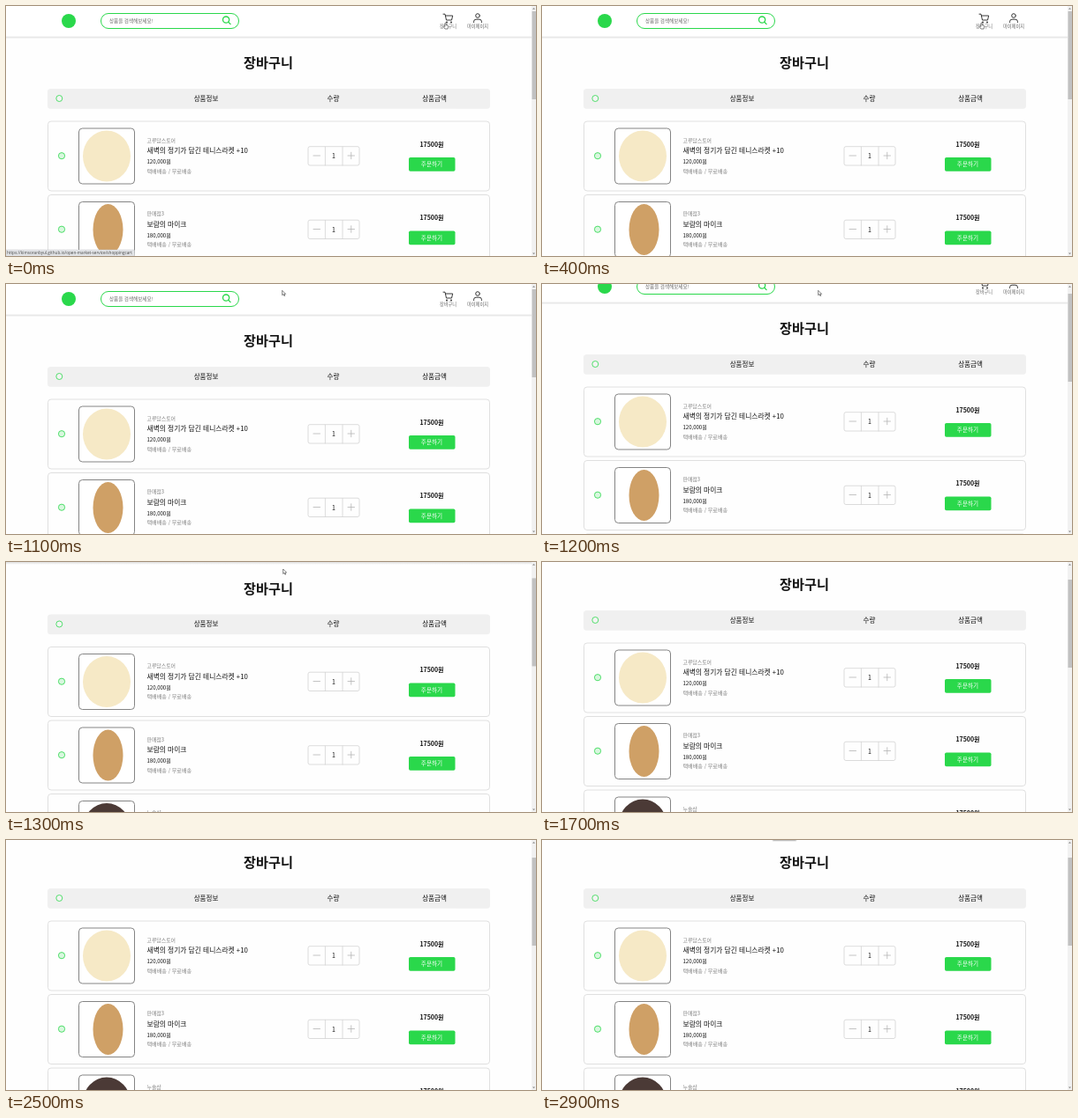
An HTML page that plays this animation: 600x284 px, repeating every 3 s.

```html
<!DOCTYPE html>
<html lang="ko">
<head>
<meta charset="utf-8">
<title>장바구니</title>
<style>
  html, body { margin: 0; width: 100%; height: 100%; overflow: hidden; background: #fefefe; }
  svg { display: block; width: 600px; height: 284px; }
  text { font-family: "Noto Sans CJK KR", "Noto Sans CJK", "Noto Sans", sans-serif; }
  .line { fill: none; stroke-linecap: round; stroke-linejoin: round; }
</style>
</head>
<body>
<svg id="stage" viewBox="0 0 600 284">
  <defs>
    <linearGradient id="shade" x1="0" y1="0" x2="0" y2="1">
      <stop offset="0" stop-color="#000" stop-opacity=".13"/>
      <stop offset="1" stop-color="#000" stop-opacity="0"/>
    </linearGradient>
  </defs>
  <rect width="600" height="284" fill="#fefefe"/>
  <g id="page"></g>
  <g id="bar">
    <rect x="595" width="5" height="284" fill="#f1f1f1"/>
    <path d="M596 3.800l1.500-1.800 1.500 1.800zM596 280.500l1.500 1.800 1.500-1.800z" fill="#888"/>
    <rect id="thumb" x="595.5" y="6" width="4.500" height="100" fill="#c1c1c1"/>
  </g>
  <g id="status">
    <path d="M0 277h144.500q1 0 1 1v6H0z" fill="#e4e6e9" stroke="#c4c6c9" stroke-width=".5"/>
    <text x="1" y="282.300" font-size="4.65" fill="#444" style="font-family:'Open Sans',sans-serif">https://kimsoranbyul.github.io/open-market-service/shoppingcart</text>
  </g>
  <g id="chip">
    <rect x="260.500" y="-4" width="28" height="5.500" rx="1.500" fill="#bbb" opacity=".5"/>
    <rect x="261.500" y="-4" width="26" height="4.800" rx="1" fill="#b4b4b4"/>
  </g>
  <g id="hand">
    <path d="M-.6 .5Q0-.4 .6 .5V2.600L2.700 3.200Q3.300 3.500 3.200 4.300L2.600 7H-.6L-2.200 4.500Q-2.200 3.600-1.300 3.900L-.6 4.500Z" fill="#fff" stroke="#333" stroke-width=".6"/>
  </g>
  <g id="arrow">
    <path d="M0 0V5.400L1.300 4.300 2.200 6.300 3.100 5.900 2.200 4H3.900Z" fill="#fff" stroke="#333" stroke-width=".6"/>
  </g>
</svg>
<script>
const GREEN = '#2ad84b', GREY = '#808080';
const $ = id => document.getElementById(id);

// Text placed by the vertical middle of its glyphs.
const text = (s, x, mid, size, { fill = '#111', weight = 400, anchor = 'start' } = {}) =>
  `<text x="${x}" y="${mid + size * 0.375}" font-size="${size}" fill="${fill}" font-weight="${weight}" text-anchor="${anchor}">${s}</text>`;
const centred = (s, x, mid, size, opts) => text(s, x, mid, size, { anchor: 'middle', ...opts });
const box = (x, y, w, h, r, fill, stroke = 'none', sw = 0.8) =>
  `<rect x="${x}" y="${y}" width="${w}" height="${h}" rx="${r}" fill="${fill}" stroke="${stroke}" stroke-width="${sw}"/>`;
const line = (d, stroke, sw) => `<path class="line" d="${d}" stroke="${stroke}" stroke-width="${sw}"/>`;
const ring = (x, y, r, fill) =>
  `<circle cx="${x}" cy="${y}" r="${r}" fill="${fill}" stroke="${GREEN}" stroke-width=".8"/>`;

const topBar = () => `
  <rect y="34.5" width="595" height="3" fill="url(#shade)"/>
  <rect width="595" height="34.5" fill="#fff"/>
  <circle cx="71" cy="17" r="8" fill="${GREEN}"/>
  ${box(107.5, 8.5, 156, 17, 8.5, '#fff', GREEN, 1)}
  ${text('상품을 검색해보세요!', 117, 16.7, 5.55, { fill: '#666' })}
  ${line('M252.700 15.600a3.600 3.600 0 1 1-7.200 0a3.600 3.600 0 1 1 7.200 0M251.800 18.300l2.300 2.300', GREEN, 1.3)}
  ${line('M495 9.200h2l1.500 6.800h6l1.200-5h-8', '#222', 0.9)}
  <circle cx="499" cy="18.5" r=".9" fill="#222"/><circle cx="504" cy="18.5" r=".9" fill="#222"/>
  ${line('M536.300 11a2.300 2.300 0 1 1-4.600 0a2.300 2.300 0 1 1 4.600 0M529.600 18.600v-1q0-2.400 2.500-2.400h3.800q2.500 0 2.500 2.400v1', '#222', 0.9)}
  ${centred('장바구니', 500.5, 22.8, 5.2, { fill: '#666' })}
  ${centred('마이페이지', 534, 22.8, 5.2, { fill: '#666' })}`;

const heading = () => {
  const opts = { weight: 500 };
  return centred('장바구니', 297, 64.5, 15.2, { weight: 700 }) +
    box(47, 94, 501, 22.7, 3.5, '#f0f0f0') + ring(60.3, 105, 3.5, '#f4f4f4') +
    centred('상품정보', 226.5, 104.8, 7.5, opts) +
    centred('수량', 370.5, 104.8, 7.5, opts) +
    centred('상품금액', 485, 104.8, 7.5, opts);
};

const card = ({ store, name, price, shape }, i) => `
  <g transform="translate(0 ${i * 83.5})">
    ${box(47.5, 131, 500, 79, 3.5, '#fefefe', '#d9d9d9')}
    ${ring(63, 170.2, 3.6, '#d9f7df')}
    ${box(82.5, 139, 63, 63, 4, '#fff', '#777', 0.9)}
    <ellipse cx="${shape.x}" cy="170.5" rx="${shape.rx}" ry="29" fill="${shape.fill}"/>
    ${text(store, 159.5, 152.7, 5.9, { fill: GREY })}
    ${text(name, 159.5, 164.2, 7.75, { weight: 500 })}
    ${text(price, 159.5, 176.8, 6, { weight: 500 })}
    ${text('택배배송 / 무료배송', 159.5, 187.6, 6.1, { fill: GREY })}
    ${box(342, 159.7, 58, 21.3, 2, '#fefefe', '#d4d4d4')}
    ${line('M361.400 160v21M381 160v21', '#d4d4d4', 0.8)}
    ${line('M348 170h7.500M387 170h7.500M390.750 166.250v7.500', '#b4b4b4', 0.8)}
    ${centred('1', 371, 170.4, 7, { weight: 500 })}
    ${centred('17500원', 482, 157, 7, { weight: 700 })}
    ${box(456, 172, 52.5, 15.8, 1.8, GREEN)}
    ${centred('주문하기', 482, 179.9, 6.6, { fill: '#fff' })}
  </g>`;

const items = [
  { store: '고루담스토어', name: '새벽의 정기가 담긴 테니스라켓 +10', price: '120,000원', shape: { x: 114, rx: 27, fill: '#f6e9c6' } },
  { store: '판매점3', name: '보람의 마이크', price: '180,000원', shape: { x: 115.5, rx: 17, fill: '#cfa066' } },
  { store: '누솔샵', name: '솔잎의 손가방', price: '150,000원', shape: { x: 114, rx: 27, fill: '#4b3a36' } },
];
$('page').innerHTML = topBar() + heading() + items.map(card).join('');

// Each track holds its value until the next [ms, value...] row.
const scroll = [[0, 0], [1200, 14], [1300, 34.5], [1400, 38], [1500, 39]];
const pointer = [
  [0, 497.5, 19], [600, 487, 20], [700, 440, 21], [800, 385, 17], [900, 338, 11],
  [1000, 316, 8], [1100, 312.7, 7.3], [1300, 313.7, 8], [1400, 313, 4], [1500, 310, -1], [1600, 308, -20],
];
const bubble = [[0, 1], [100, 0.65], [200, 0.3], [300, 0]];
const at = (track, t) => track.findLast(row => row[0] <= t).slice(1);

function draw(t) {
  const [y] = at(scroll, t), [px, py] = at(pointer, t);
  const overLink = t < 700;
  $('page').setAttribute('transform', `translate(0 ${-y})`);
  $('thumb').setAttribute('y', 6 + y * 0.36);
  $('status').setAttribute('opacity', at(bubble, t)[0]);
  $('chip').setAttribute('opacity', t >= 2900 ? 1 : 0);
  for (const id of ['hand', 'arrow']) {
    $(id).setAttribute('transform', `translate(${px} ${py})`);
    $(id).setAttribute('opacity', (id === 'hand') === overLink ? 1 : 0);
  }
}

const start = performance.now();
function tick() {
  draw((performance.now() - start) % 3000);
  requestAnimationFrame(tick);
}
tick();
</script>
</body>
</html>
```
